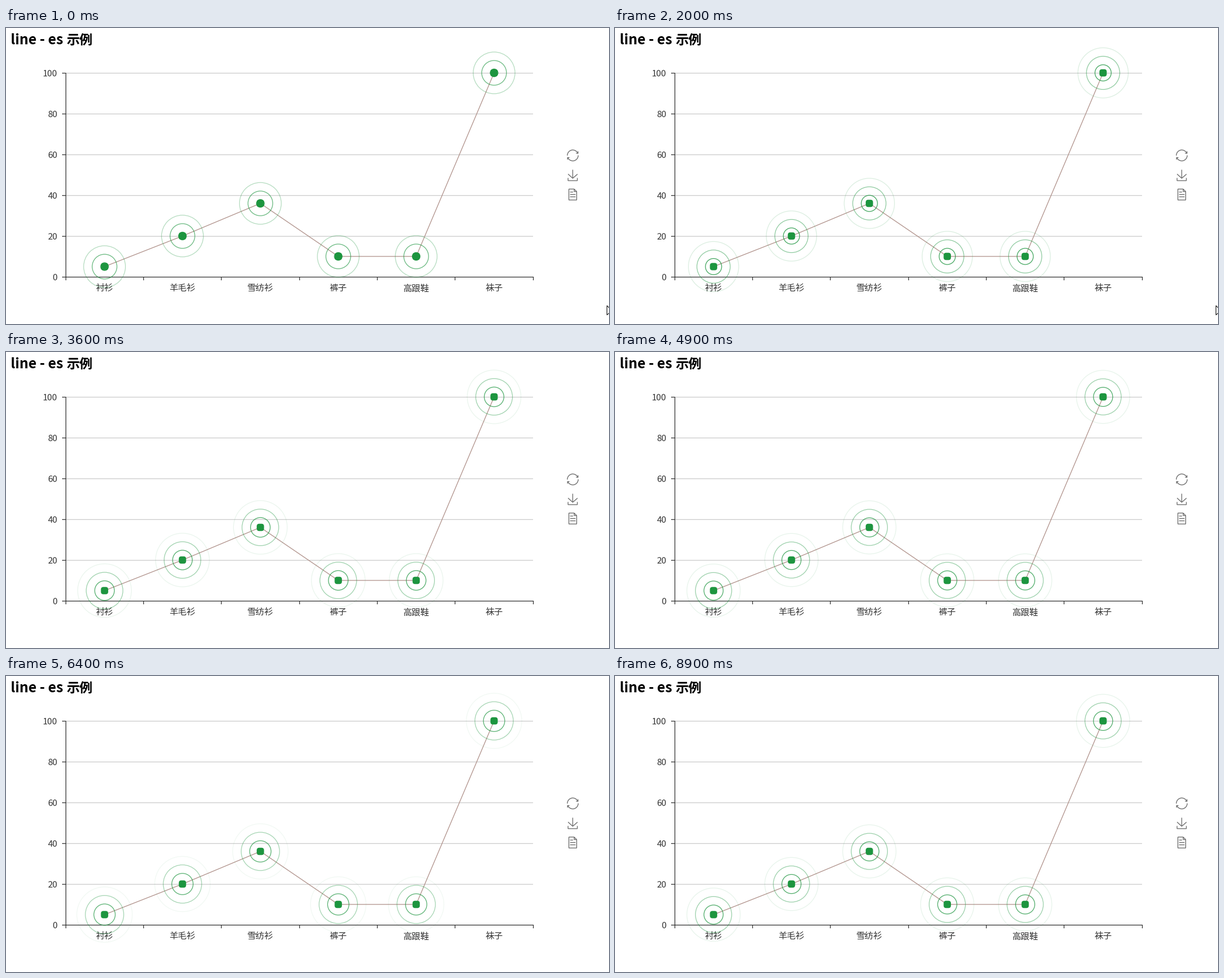
A matplotlib script for the animation above (9000 ms loop, 1032 by 508 pixels).

```python
import numpy as np
import matplotlib.pyplot as plt
from matplotlib.animation import FuncAnimation
from matplotlib.patches import Circle, FancyBboxPatch, PathPatch, Polygon
from matplotlib.path import Path

W, H, DPI = 1032, 508, 64
FRAMES, INTERVAL = 90, 100
LEFT, TOP, PLOT_W, PLOT_H = 102, 77, 800, 350
BASE = TOP + PLOT_H
STROKE = 1.25

GREEN, LINE, DARK, GRID, ICON = "#1d953f", "#b0928b", "#333333", "#cccccc", "#666666"
CJK = "Noto Sans CJK JP"

NAMES = ["衬衫", "羊毛衫", "雪纺衫", "裤子", "高跟鞋", "袜子"]
VALUES = np.array([5, 20, 36, 10, 10, 100])

PERIOD = 4000
START = 0.008
RINGS = 3
R_MIN, R_MAX = 6.25, 50
CURSOR_FRAMES = 25


def pt(px):
    return px * 72 / DPI


fig = plt.figure(figsize=(W / DPI, H / DPI), dpi=DPI, facecolor="white")
ax = fig.add_axes([0, 0, 1, 1])
ax.set_xlim(0, W)
ax.set_ylim(H, 0)
ax.axis("off")


def line(xs, ys, color, z, width=STROKE):
    ax.plot(xs, ys, color=color, lw=pt(width), zorder=z, snap=False,
            solid_capstyle="butt", solid_joinstyle="bevel")


def label(x, y, text, size=15, color=DARK, **kw):
    ax.text(x, y, text, fontsize=pt(size), color=color, family=CJK,
            va="baseline", zorder=4, **kw)


def icon(strokes, center, scale, middle):
    """Stroke polylines and Bezier chains, scaled about their middle."""
    for points, curved in strokes:
        pts = (np.array(points) - middle) * scale + center
        step = Path.CURVE4 if curved else Path.LINETO
        codes = [Path.MOVETO] + [step] * (len(pts) - 1)
        ax.add_patch(PathPatch(Path(pts, codes), fill=False, ec=ICON,
                               lw=pt(STROKE), zorder=4, snap=False,
                               capstyle="butt", joinstyle="miter"))


# Title
label(8, 28, "line - es", 24, "black", weight="bold")
label(103, 28.3, "示例", 22.5, "black", weight="bold")

# Grid and axes
for v in range(0, 101, 20):
    y = BASE - v / 100 * PLOT_H + 0.5
    if v:
        line([LEFT, LEFT + PLOT_W], [y, y], GRID, 1)
    line([LEFT - 6, LEFT], [y, y], DARK, 2)
    label(88, y + 5.5, str(v), ha="right")
line([LEFT + 0.5] * 2, [TOP, BASE + 1], DARK, 2)
line([LEFT, LEFT + PLOT_W + 1], [BASE + 0.5] * 2, DARK, 2)

step = PLOT_W / len(NAMES)
for i in range(len(NAMES) + 1):
    x = np.floor(LEFT + i * step) + 0.5
    line([x, x], [BASE, BASE + 6], DARK, 2)
xs = LEFT + (np.arange(len(NAMES)) + 0.5) * step
ys = BASE - VALUES / 100 * PLOT_H
for x, name in zip(xs, NAMES):
    label(x, 451.3, name, ha="center")

# Series
line(xs, ys, LINE, 3)
rings = []
for x, y in zip(xs, ys):
    ax.add_patch(FancyBboxPatch((x - R_MIN, y - R_MIN), 2 * R_MIN, 2 * R_MIN,
                                boxstyle="round,pad=0,rounding_size=4.3",
                                fc=GREEN, ec="none", zorder=6, snap=False))
    for k in range(RINGS):
        ring = Circle((x, y), R_MIN, fill=False, ec=GREEN, lw=pt(STROKE), zorder=5)
        rings.append((ring, k / RINGS))
        ax.add_patch(ring)

# Toolbox: refresh, download, document
half = [([(47, 18.9), (56.8, 18.9), (56.8, 8.7)], False),
        ([(56.3, 20.1), (52.1, 9), (40.5, 0.6), (26.8, 2.1),
          (12.6, 3.7), (1.6, 16.2), (2.1, 30.6)], True)]
turned = [([(60 - x, 60 - y) for x, y in p], c) for p, c in half]
icon(half + turned, (970, 218.7), 0.3336, (30, 30))
icon([([(4.7, 22.9), (29.3, 45.5), (54.7, 23.4)], False),
      ([(4.6, 43.6), (4.6, 58), (53.8, 58), (53.8, 43.6)], False),
      ([(29.2, 45.1), (29.2, 0)], False)], (970, 252.6), 0.323, (29.6, 29))
icon([([(17.5, 17.3), (33, 17.3)], False),
      ([(17.5, 29.5), (45.4, 29.5)], False),
      ([(17.5, 41.7), (45.4, 41.7)], False),
      ([(38.4, 2), (11.5, 2), (11.5, 58), (51, 58), (51, 14.8), (38.4, 2)], False),
      ([(38.4, 2.2), (38.4, 14.9), (51, 14.9)], False)],
     (970, 285.8), 0.335, (31.25, 30))

# Mouse pointer, cut off by the right edge
cursor = Polygon([(1028.5, 476.5), (1040.5, 488.5), (1033, 488.5), (1028.5, 492.5)],
                 fc="white", ec="black", lw=pt(1), zorder=8, snap=False)
ax.add_patch(cursor)


def update(n):
    phase = START + n * INTERVAL / PERIOD
    for ring, offset in rings:
        u = (phase + offset) % 1
        ring.set_radius(R_MIN + (R_MAX - R_MIN) * u)
        ring.set_alpha(1 - u)
    cursor.set_visible(n < CURSOR_FRAMES)
    return [ring for ring, _ in rings] + [cursor]


anim = FuncAnimation(fig, update, frames=FRAMES, interval=INTERVAL,
                     repeat=True, repeat_delay=0, blit=False)
plt.show()
```
